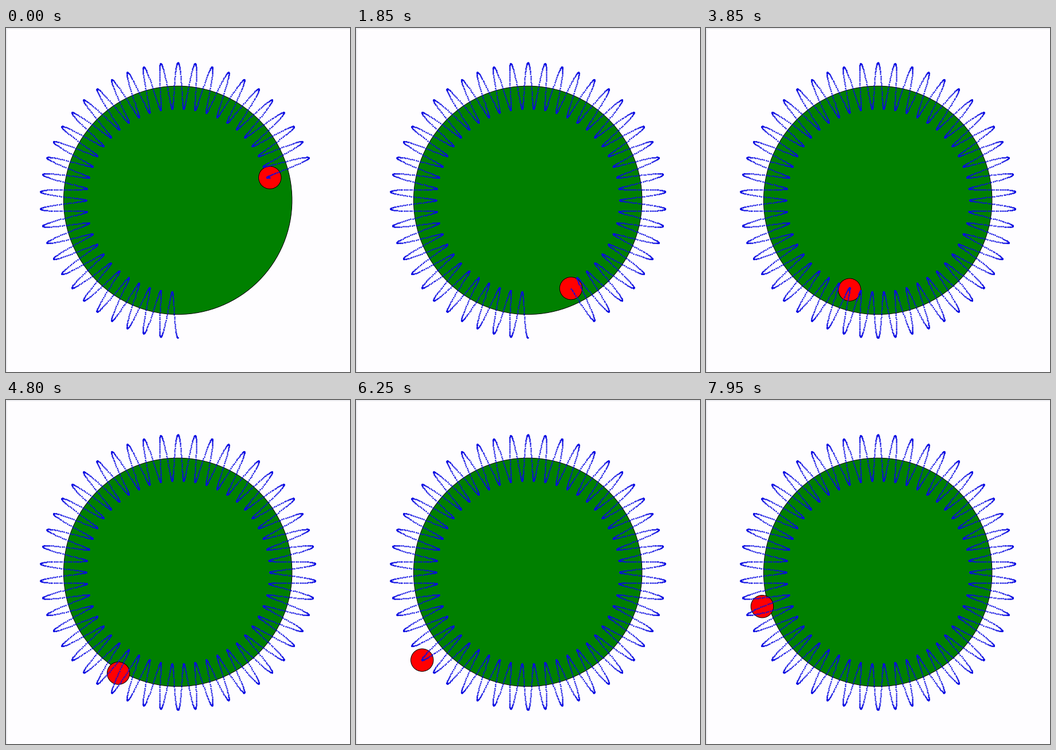
These frames come from a looping animation (600x600 px, 8 s). A matplotlib script:

```python
import numpy as np
import matplotlib.pyplot as plt
from matplotlib.animation import FuncAnimation
from matplotlib.patches import Circle, Rectangle

SIZE, DPI = 600, 100
PX = 72 / DPI
FRAMES, INTERVAL = 160, 50
CX, CY = 299.7, 300.4
RADIUS, SWING, WAVES = 200, 40, 50

# The ball runs fast, then slows near the end of its first lap
KNOTS = [0, 46.7, 77, 159]
ANGLES = [256.2, 354.3, 377.5, 433.5]


def orbit(deg):
    """Wavy path around the disc, clockwise from the bottom."""
    a = np.radians(deg)
    r = RADIUS + SWING * np.cos(WAVES * a)
    return CX - r * np.sin(a), CY + r * np.cos(a)


fig = plt.figure(figsize=(SIZE / DPI, SIZE / DPI), dpi=DPI)
fig.patch.set_facecolor("#fefdff")
ax = fig.add_axes([0, 0, 1, 1])
ax.set_xlim(0, SIZE)
ax.set_ylim(SIZE, 0)
ax.axis("off")

for w, h in ((SIZE, 2), (2, SIZE)):
    ax.add_patch(Rectangle((0, 0), w, h, fc="#ececf0", lw=0))


def disc(x, y, r, color, z):
    return ax.add_patch(Circle((x, y), r, fc=color, ec="black",
                               lw=PX, zorder=z))


disc(CX, CY, RADIUS - 0.8, "#008000", 1)
ball = disc(*orbit(ANGLES[0]), 19.7, "#ff0000", 2)

steps = np.arange(0, 360.05, 0.1)
trail_x, trail_y = orbit(steps)
trail, = ax.plot([], [], "o", ms=2.5 * PX, mew=0, color="#0a0ae2",
                 snap=False, zorder=3)


def update(i):
    deg = np.interp(i, KNOTS, ANGLES)
    n = np.searchsorted(steps, deg + 0.01)
    trail.set_data(trail_x[:n], trail_y[:n])
    ball.center = orbit(deg)
    return trail, ball


anim = FuncAnimation(fig, update, frames=FRAMES, interval=INTERVAL,
                     init_func=lambda: update(0), repeat=True, repeat_delay=0)
plt.show()
```
